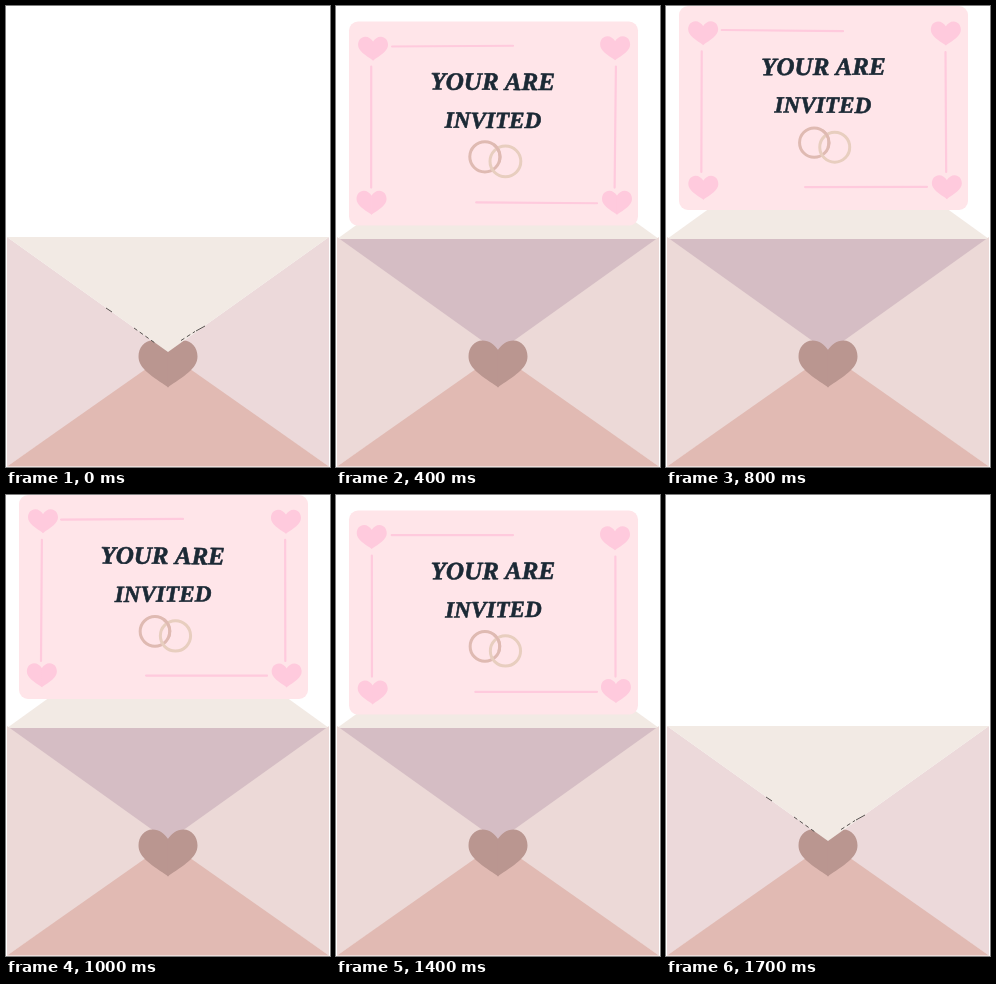
These frames come from a looping animation (324 px wide and 461 px high, 2000 ms). An HTML page with a canvas:

```html
<!DOCTYPE html>
<html lang="en">
<head>
<meta charset="utf-8">
<title>Invitation</title>
<style>
  html, body { margin: 0; width: 100%; height: 100%; overflow: hidden; background: #fff; }
  canvas { display: block; width: 324px; height: 461px; }
</style>
</head>
<body>
<canvas id="stage" width="324" height="461"></canvas>
<script>
const ctx = document.getElementById('stage').getContext('2d');
const LOOP = 2000, STEP = 100;
const FIRST = 2, LAST = 16;
const LEFT = 1, RIGHT = 323, MIDDLE = 162, FOLD = 231, BASE = 460.5;

const COLOR = {
  flap: '#f2eae4', inside: '#d5bdc4', sideClosed: '#ecd9da', sideOpen: '#ecd9d7',
  bottom: '#e1bab3', seal: '#ba9690', card: '#ffe5e9', pink: '#ffcadd',
  ink: '#1b2935', ringA: '#dfbab2', ringB: '#e8cebf'
};

// Repeatable noise in -1..1, giving the card its hand-drawn wobble.
function seededNoise(seed) {
  let count = 0;
  return () => {
    const n = Math.sin(seed * 127.1 + ++count * 311.7) * 43758.5453;
    return 2 * (n - Math.floor(n)) - 1;
  };
}

function polygon(color, ...points) {
  ctx.fillStyle = color;
  ctx.beginPath();
  points.forEach(([x, y]) => ctx.lineTo(x, y));
  ctx.fill();
}

function line(x1, y1, x2, y2) {
  ctx.beginPath();
  ctx.moveTo(x1, y1);
  ctx.lineTo(x2, y2);
  ctx.stroke();
}

function heart(x, y, w, h, color) {
  ctx.fillStyle = color;
  for (const side of [-1, 1]) {
    ctx.save();
    ctx.translate(x, y);
    ctx.scale(side * w, h);
    ctx.beginPath();
    ctx.moveTo(-0.01, -0.28);
    ctx.bezierCurveTo(0.06, -0.42, 0.15, -0.5, 0.26, -0.5);
    ctx.bezierCurveTo(0.4, -0.5, 0.5, -0.35, 0.5, -0.16);
    ctx.bezierCurveTo(0.5, 0.1, 0.26, 0.27, -0.01, 0.5);
    ctx.fill();
    ctx.restore();
  }
}

function ring(x, y, r, color, from = 0, to = 2 * Math.PI) {
  ctx.strokeStyle = color;
  ctx.lineWidth = 3;
  ctx.beginPath();
  ctx.arc(x, y, r, from, to);
  ctx.stroke();
}

function caption(text, y, size, noise) {
  ctx.save();
  ctx.translate(157 + noise() / 2, y + noise() / 2);
  ctx.rotate(noise() * 0.008);
  ctx.font = `italic bold ${size}px "Liberation Serif", serif`;
  ctx.textAlign = 'center';
  ctx.fillStyle = ctx.strokeStyle = COLOR.ink;
  ctx.lineWidth = 0.6;
  ctx.lineJoin = 'round';
  ctx.fillText(text, 0, 8.5);
  ctx.strokeText(text, 0, 8.5);
  ctx.restore();
}

function drawCard(top, noise) {
  ctx.save();
  ctx.translate(0, top);
  ctx.fillStyle = COLOR.card;
  ctx.beginPath();
  ctx.roundRect(13, 0, 289, 204, 9);
  ctx.fill();

  ctx.strokeStyle = COLOR.pink;
  ctx.lineWidth = 2.2;
  ctx.lineCap = 'round';
  for (const y of [27, 181])
    for (const x of [36.5, 280])
      heart(x + noise(), y + noise(), 30, 24, COLOR.pink);
  for (const [x, y] of [[56, 24.5], [140, 181]])
    line(x + noise(), y + noise() / 2, x + 121, y + noise());
  for (const x of [35.5, 279.5])
    line(x + noise() / 2, 45.5 + noise(), x + noise(), 166);

  caption('YOUR ARE', 60, 25, noise);
  caption('INVITED', 98, 23.2, noise);

  const x = 148.5 + noise() / 2, y = 136 + noise(), r = 15 + noise() / 2;
  ring(x, y, r, COLOR.ringA);
  ring(x + 20.5, y + 4.5, r + 0.3, COLOR.ringB);
  ring(x, y, r, COLOR.ringA, -0.9, 0.3);
  ctx.restore();
}

function drawFront(sideColor) {
  for (const x of [LEFT, RIGHT])
    polygon(sideColor, [x, FOLD], [MIDDLE, 346], [MIDDLE, 350], [x, BASE]);
  polygon(COLOR.bottom, [LEFT, BASE], [MIDDLE, 347.5], [RIGHT, BASE]);
  heart(MIDDLE, 358, 59, 47, COLOR.seal);
}

function drawFlapMarks() {
  ctx.strokeStyle = '#57524f';
  ctx.lineWidth = 1;
  ctx.lineCap = 'butt';
  line(100, 302, 106, 306);
  line(190, 325, 199, 320);
  ctx.setLineDash([4, 3]);
  line(128, 322, 149, 337);
  line(175, 334.5, 189, 325.5);
  ctx.setLineDash([]);
}

function drawClosed() {
  drawFront(COLOR.sideClosed);
  polygon(COLOR.flap, [LEFT, FOLD], [RIGHT, FOLD], [MIDDLE, 346]);
  drawFlapMarks();
}

function drawOpen(step) {
  const fromClosed = Math.min(step - FIRST, LAST - step);
  const cardTop = Math.max(0, 150 - 67.2 * fromClosed);
  polygon(COLOR.flap, [LEFT, 233], [MIDDLE, 117], [RIGHT, 233]);
  polygon(COLOR.inside, [LEFT, 233], [RIGHT, 233], [MIDDLE, 350]);
  drawCard(cardTop, seededNoise(step));
  drawFront(COLOR.sideOpen);
}

function draw(step) {
  ctx.fillStyle = '#fff';
  ctx.fillRect(0, 0, 324, 461);
  if (step < FIRST || step > LAST) drawClosed();
  else drawOpen(step);
}

const start = performance.now();
function tick() {
  const time = (performance.now() - start) % LOOP;
  draw(Math.floor(time / STEP));
  requestAnimationFrame(tick);
}
tick();
</script>
</body>
</html>
```
